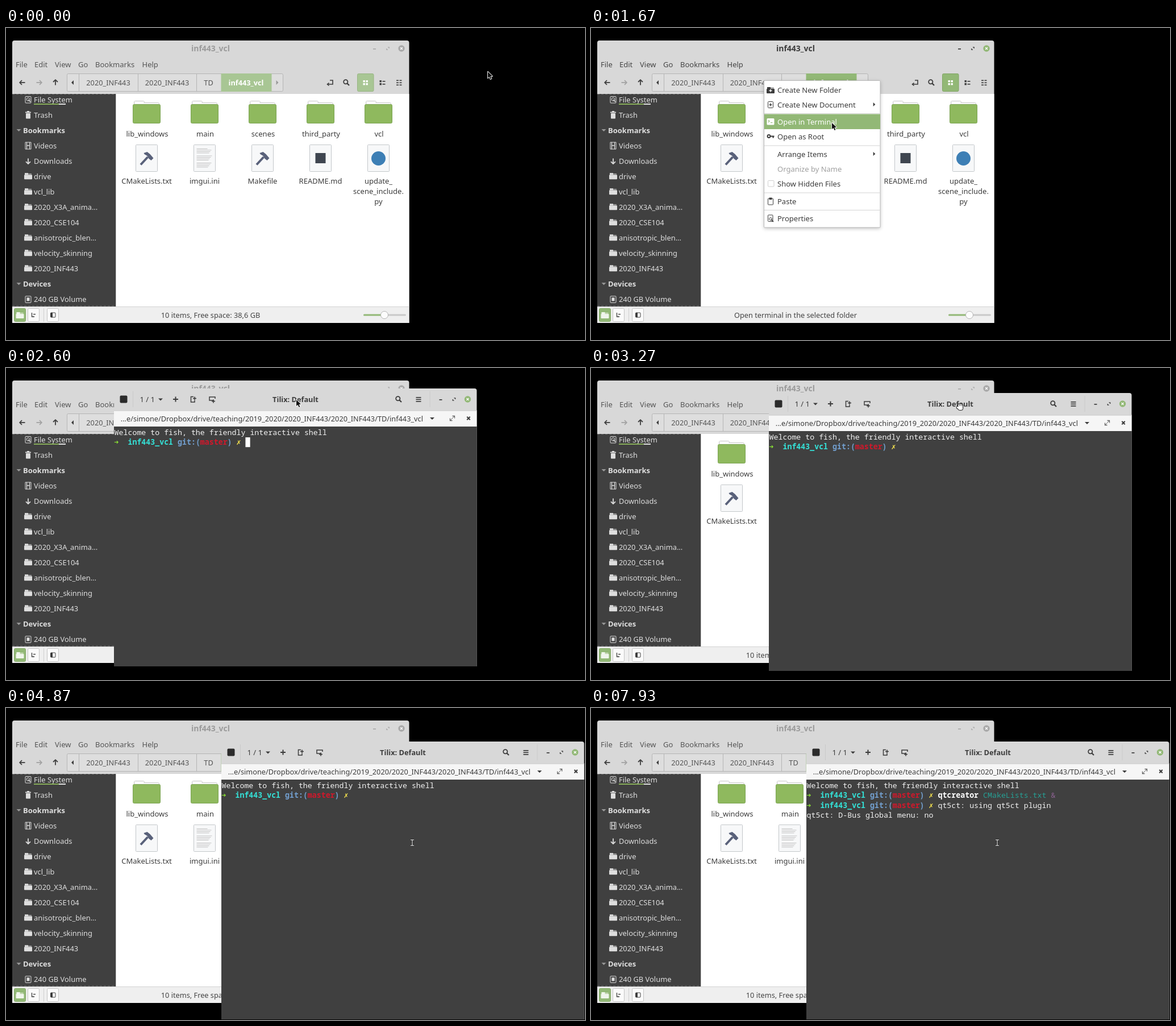
Recreate the animation shown at these times as an HTML page with a canvas. Size 1019 px wide and 549 px high, loop 8000 ms.

```html
<!DOCTYPE html>
<html lang="en">
<head>
<meta charset="utf-8">
<title>Opening a project from a terminal</title>
<style>
html, body { margin: 0; width: 100%; height: 100%; overflow: hidden; background: #000; }
canvas { display: block; }
</style>
</head>
<body>
<canvas id="stage" width="1019" height="549"></canvas>
<script>
const c = document.getElementById('stage').getContext('2d');
const LOOP = 8000, STEP = 1000 / 15;
const SANS = '"Noto Sans", "Open Sans", sans-serif';
const MONO = '"Noto Sans Mono", "DejaVu Sans Mono", monospace';
const CHROME = '#d8d8d8', DARK = '#404040', INK = '#3c3c3c', GREEN = '#92b876', PALE = '#a8c694';
const CELL = 7.96, ROW = 17.6, SMALL = 12.75;

// drawing helpers
function text(s, x, y, color = INK, align = 'left', weight = 400, size = 13, family = SANS) {
  c.font = `${weight} ${size}px ${family}`;
  c.textAlign = align;
  c.fillStyle = color;
  c.fillText(s, x, y);
}
function rect(x, y, w, h, fill) { c.fillStyle = fill; c.fillRect(x, y, w, h); }
function box(x, y, w, h, r, fill, stroke) {
  c.beginPath();
  c.roundRect(x, y, w, h, r);
  if (fill) { c.fillStyle = fill; c.fill(); }
  if (stroke) { c.strokeStyle = stroke; c.lineWidth = 1; c.stroke(); }
}
function disc(x, y, r, fill, stroke) {
  c.beginPath();
  c.arc(x, y, r, 0, 7);
  if (fill) { c.fillStyle = fill; c.fill(); }
  if (stroke) { c.strokeStyle = stroke; c.stroke(); }
}
function trace(points) {
  c.beginPath();
  points.forEach(([x, y], i) => i ? c.lineTo(x, y) : c.moveTo(x, y));
}
function line(points, color = INK, width = 1.6) {
  trace(points);
  c.strokeStyle = color;
  c.lineWidth = width;
  c.stroke();
}
function poly(points, fill) { trace(points); c.closePath(); c.fillStyle = fill; c.fill(); }
function at(x, y, draw) { c.save(); c.translate(x, y); draw(); c.restore(); }

// small icons, each around its centre
function arrow(x, y, turn, color = INK) {
  at(x, y, () => {
    c.rotate(turn);
    line([[-4.5, 0], [4.5, 0]], color, 1.8);
    line([[1, -4], [4.8, 0], [1, 4]], color, 1.8);
  });
}
function triangle(x, y, turn, s, color = INK) {
  at(x, y, () => { c.rotate(turn); poly([[-s / 2, -s], [s / 2, 0], [-s / 2, s]], color); });
}
function lens(x, y) {
  c.lineWidth = 1.8;
  disc(x - 1.2, y - 1.2, 3.6, null, INK);
  line([[x + 1.5, y + 1.5], [x + 5, y + 5]], INK, 2.2);
}
function cross(x, y, s, color, width = 1.5) {
  line([[x - s, y - s], [x + s, y + s]], color, width);
  line([[x + s, y - s], [x - s, y + s]], color, width);
}
function expand(x, y, s, color, width = 1.4) {
  line([[x, y - s], [x + s, y - s], [x + s, y]], color, width);
  line([[x - s, y], [x - s, y + s], [x, y + s]], color, width);
  if (s > 3) line([[x - s, y + s], [x + s, y - s]], color, 1);
}
function miniFolder(x, y, color) {
  rect(x - 6, y - 5, 6, 3, color);
  box(x - 7, y - 2, 14, 8, 1, color);
  rect(x - 6, y - 3.8, 12, 1, color);
}
function windowButtons(x, y, active) {
  const ink = active ? INK : '#ababab';
  rect(x - 50, y, 5, 1.7, ink);
  expand(x - 24, y, 2.2, ink, 1.3);
  disc(x, y, 5.7, active ? GREEN : '#a9a9a9');
  cross(x, y, 2, '#fff', 1.3);
}

function sidebar() {
  rect(11, 116, 182.5, 374, DARK);
  c.setLineDash([4, 3]);
  line([[11, 116.5], [193, 116.5]], '#6b6b6b', 1);
  line([[11, 489], [193, 489]], '#6b6b6b', 1);
  c.setLineDash([]);
  const rows = ['File System', 'Trash', '*Bookmarks', 'Videos', 'Downloads', 'drive', 'vcl_lib',
    '2020_X3A_anima...', '2020_CSE104', 'anisotropic_blen...', 'velocity_skinning', '2020_INF443',
    '*Devices', '240 GB Volume'];
  const pale = '#dedede';
  rows.forEach((name, i) => {
    const y = 126 + 27.03 * i;
    if (name[0] === '*') {
      triangle(22.5, y, Math.PI / 2, 4, '#9a9a9a');
      text(name.slice(1), 30, y + 4.7, pale, 'left', 700);
      return;
    }
    text(name, 49, y + 4.7, pale, 'left', 400, 12.9);
    if (i === 0 || i === 13) {
      box(34, y - 5.5, 10, 11.5, 1, null, pale);
      if (i) rect(36.5, y - 3, 5, 6, pale);
      else { disc(39, y - 0.5, 2.8, null, pale); line([[39, y], [43, y + 4]], pale, 1.5); }
    } else if (i === 1) {
      rect(34, y - 5.5, 10, 1.8, pale);
      rect(37, y - 7, 4, 2, pale);
      box(35, y - 3, 8, 9.5, 1, pale);
    } else if (i === 3) {
      box(34, y - 6, 10, 12, 0, null, pale);
      line([[36.5, y - 6], [36.5, y + 6]], pale, 1.3);
      line([[41.5, y - 6], [41.5, y + 6]], pale, 1.3);
      rect(36.5, y - 1, 5, 1.4, pale);
    } else if (i === 4) arrow(39, y, Math.PI / 2, pale);
    else miniFolder(39, y - 1, pale);
  });
  rect(49, 133, 44, 1.8, '#8fb95c');
  rect(93, 133, 12, 1.8, '#f0f0f0');
}

function folder(x, name) {
  box(x - 22, 128.5, 18, 12, 2, '#fbfbfb', '#c9c9c9');
  box(x - 22, 131.5, 44, 20, 2, '#fbfbfb', '#c9c9c9');
  rect(x - 21, 129.5, 16, 6, '#fbfbfb');
  box(x - 24, 134.5, 48, 33, 2, '#8fb95e', '#7aa351');
  text(name, x + 1, 191, INK, 'center');
}
function paper(x, lines, kind) {
  box(x - 19, 205.5, 38, 47, 1, '#f7f8f9', '#c3c7ca');
  lines.forEach((s, i) => text(s, x, 273.5 + 18.4 * i, INK, 'center'));
  if (kind === 'hammer') at(x, 229, () => {
    line([[-10.5, 11.5], [2, -2]], '#59617a', 4);
    poly([[-5, -9], [1, -11], [6, -7], [12, 0], [8, 4], [4, 1], [1, -4], [-4, -7]], '#59617a');
  });
  if (kind === 'text') for (let i = 0; i < 15; i++) {
    if (i % 5 !== 4) rect(x - 14, 212 + 2.5 * i, 19 + (i * 7) % 9, 0.9, '#bfbfbf');
  }
  if (kind === 'square') rect(x - 9, 220, 18, 18, '#3f4650');
  if (kind === 'disc') disc(x, 229.5, 12.5, '#3d7fb5');
}

function fileWindow(active, status) {
  box(11, 22, 698.5, 497, [4, 4, 0, 0], CHROME);
  text('inf443_vcl', 360, 41, active ? INK : '#9b9b9b', 'center', 700, 14);
  windowButtons(696, 36, active);
  const menuInk = active ? '#454545' : '#555';
  [['File', 17], ['Edit', 50], ['View', 86], ['Go', 127], ['Bookmarks', 157], ['Help', 239.5]]
    .forEach(([s, x]) => text(s, x, 68.5, menuInk));

  const green = active ? GREEN : PALE;
  arrow(29, 96, Math.PI);
  arrow(58, 96, 0, '#a2a2a2');
  arrow(87, 96, -Math.PI / 2);
  box(107.5, 80.5, 380, 31, 2, '#dedede', '#b5b5b5');
  rect(378.5, 80, 89, 32, green);
  [128.5, 232.5, 335.5].forEach(x => rect(x - 0.5, 81, 1, 30, '#b5b5b5'));
  triangle(117, 96, Math.PI, 4);
  triangle(477.5, 96, 0, 4, '#999');
  [['2020_INF443', 180], ['2020_INF443', 283.5], ['TD', 356.5]]
    .forEach(([s, x]) => text(s, x, 101, '#555', 'center', 400, SMALL));
  text('inf443_vcl', 422.5, 101, '#fff', 'center', 700, SMALL);
  line([[570, 92], [575, 92], [575, 99], [566, 99]]);
  line([[568.5, 96.5], [565.5, 99], [568.5, 101.5]]);
  lens(599, 96);
  box(618.5, 80.5, 28.5, 31, 2, green, active ? '#7fa463' : '#97b482');
  for (let i = 0; i < 4; i++) rect(628.5 + 5 * (i % 2), 92 + 5 * (i >> 1), 3.4, 3.4, '#fff');
  for (let i = 0; i < 2; i++) {
    rect(657.5, 92 + 5 * i, 3.4, 3.4, INK);
    rect(662.5, 93 + 5 * i, 5, 1.6, INK);
  }
  for (let i = 0; i < 6; i++) rect(687 + 5.5 * (i % 2), 91.5 + 4 * (i >> 1), 4, 1.6, INK);

  sidebar();
  rect(193.5, 116, 516, 374, '#fff');
  const column = i => 247.5 + 102 * i;
  ['lib_windows', 'main', 'scenes', 'third_party', 'vcl'].forEach((s, i) => folder(column(i), s));
  [[['CMakeLists.txt'], 'hammer'], [['imgui.ini'], 'text'], [['Makefile'], 'hammer'],
    [['README.md'], 'square'], [['update_', 'scene_include.', 'py'], 'disc']]
    .forEach(([s, kind], i) => paper(column(i), s, kind));

  rect(11, 490, 698.5, 29, '#efefef');
  rect(11, 490, 698.5, 1, '#d2d2d2');
  box(14.5, 493.5, 20, 23, 2, GREEN, '#83a868');
  miniFolder(24.5, 505, '#f0f5ec');
  box(38.5, 493.5, 20, 23, 2, '#fafafa', '#c4c4c4');
  line([[45.5, 501], [45.5, 508], [50, 508]], INK, 1.3);
  rect(48, 503, 4, 1.3, INK);
  rect(66, 493, 1, 24, '#d0d0d0');
  box(72.5, 493.5, 20, 23, 2, '#fafafa', '#c4c4c4');
  box(78.5, 501, 8.5, 8, 1, null, INK);
  rect(79, 501, 3, 8, INK);
  text(status, 360, 510, '#444', 'center', 400, SMALL);
  box(629, 503.5, 37, 3, 1.5, GREEN);
  box(666, 503.5, 38, 3, 1.5, '#c9c9c9');
  disc(666, 505, 6.5, '#fcfcfc', '#b3b3b3');
}

const MENU = [['Create New Folder', 109], ['Create New Document', 135], ['Open in Terminal', 165],
  ['Open as Root', 191.5], ['Arrange Items', 222], ['Organize by Name', 248],
  ['Show Hidden Files', 274.5], ['Paste', 305], ['Properties', 335]];

function hoveredItem([x, y]) {
  return x < 305 ? -1 : MENU.findIndex(([, cy], i) => i !== 5 && Math.abs(y - cy) < 13.3);
}
function contextMenu(hover) {
  c.save();
  c.shadowColor = 'rgba(0,0,0,.25)';
  c.shadowBlur = 6;
  c.shadowOffsetY = 2;
  box(304.5, 92.5, 204.5, 258.5, 1, '#fff');
  c.restore();
  box(304.5, 92.5, 204.5, 258.5, 1, null, '#b9b9b9');
  [150, 206.5, 289.5, 320].forEach(y => rect(305, y, 203.5, 1, '#d4d4d4'));
  MENU.forEach(([s, y], i) => {
    const ink = i === hover ? '#fff' : i === 5 ? '#a0a0a0' : INK;
    if (i === hover) rect(305, y - 13.5, 204, 26.5, GREEN);
    text(s, 328, y + 4.8, ink);
    const x = 316;
    if (i === 0) { miniFolder(x, y, ink); rect(x - 2.5, y + 0.5, 5, 1.4, '#fff'); rect(x - 0.7, y - 1.3, 1.4, 5, '#fff'); }
    if (i === 1) { box(x - 4.5, y - 5.5, 9, 11, 1, null, ink); rect(x - 2.5, y - 0.7, 5, 1.4, ink); rect(x - 0.7, y - 2.5, 1.4, 5, ink); }
    if (i === 2) {
      box(x - 6.5, y - 6, 13, 11.5, 1.5, ink);
      const cut = i === hover ? GREEN : '#fff';
      line([[x - 4, y - 3], [x - 2, y - 1], [x - 4, y + 1]], cut, 1.1);
      rect(x, y + 1, 3.5, 1.1, cut);
    }
    if (i === 3) { c.lineWidth = 2; disc(x - 3, y - 1, 2.4, null, ink); rect(x - 0.5, y - 2, 7, 2, ink); rect(x + 3.5, y - 1, 2.2, 3, ink); }
    if (i === 6) box(x - 4.5, y - 6, 10.5, 10.5, 1, '#fff', '#cfcfcf');
    if (i === 7) { box(x - 4.5, y - 5, 9, 11, 1, null, ink); rect(x - 2.5, y - 6.5, 5, 3.5, ink); }
    if (i === 8) { box(x - 4.5, y - 6, 8.5, 11.5, 1, null, ink); disc(x, y + 1, 2.3, null, ink); line([[x + 1, y + 2], [x + 5, y + 6]], ink, 1.7); }
    if (i === 1 || i === 4) triangle(498.5, y - 0.5, 0, 3.6, ink);
  });
}

// terminal text: runs are [column, string, colour, weight]
const PROMPT = [[0, '➜', '#8ae234', 700], [3, 'inf443_vcl', '#34e2d8', 700], [14, 'git:(', '#729fcf', 700],
  [19, 'master', '#d0182b', 700], [25, ')', '#729fcf', 700], [27, '✗', '#fce94f', 700]];
const WHITE = '#f2f2f2', HINT = '#747674';
const COMMAND = [[29, 'qtcreator', '#fff', 700], [39, 'CMakeLists.txt', '#26a095', 400], [54, '&', '#8b6190', 400]];

function typed(n) {
  return [[29, 'qt'.slice(0, n), '#d0182b', 400], [29 + n, 'qtcreator CMakeLists.txt &'.slice(n), HINT, 400]];
}
const KEYS = { ready: 2530, first: 5200, second: 5730, accept: 5920, enter: 7330, output: 7600, menu: 7660 };

function shell(t) {
  if (t < KEYS.ready) return { rows: [], cursor: [0, 0], since: 2300 };
  const rows = [[[0, 'Welcome to fish, the friendly interactive shell', WHITE, 400]], PROMPT.slice()];
  let cursor = [29, 1], since = KEYS.ready;
  if (t >= KEYS.accept) { rows[1].push(...COMMAND); cursor = [55, 1]; since = KEYS.accept; }
  else if (t >= KEYS.second) { rows[1].push(...typed(2)); cursor = [31, 1]; since = KEYS.second; }
  else if (t >= KEYS.first) { rows[1].push(...typed(1)); cursor = [30, 1]; since = KEYS.first; }
  if (t >= KEYS.enter) { rows.push(PROMPT.slice()); cursor = [29, 2]; since = KEYS.enter - 40; }
  if (t >= KEYS.output) { rows[2].push([29, 'qt5ct: using qt5ct plugin', WHITE, 400]); cursor = [0, 3]; }
  if (t >= KEYS.menu) { rows.push([[0, 'qt5ct: D-Bus global menu: no', WHITE, 400]]); cursor = [0, 4]; }
  return { rows, cursor, since };
}

function terminal(t) {
  box(0, 0, 638.5, 489, [4, 4, 0, 0], CHROME);
  rect(0, 38.5, 638.5, 28.5, '#f6f6f6');
  rect(0, 38.5, 638.5, 1, '#c2c2c2');
  rect(0, 67, 638.5, 422, DARK);
  box(10.5, 12.5, 13, 13, 2, '#2b2b2b');
  [33, 555.5].forEach(x => rect(x, 5, 1, 28, '#c9c9c9'));
  text('1 / 1', 45.5, 24);
  triangle(82, 19.5, Math.PI / 2, 4);
  rect(104, 18, 9, 2, INK);
  rect(107.5, 14.5, 2, 9, INK);
  line([[140, 14.5], [135.5, 14.5], [135.5, 24], [142, 24], [142, 21]], INK, 1.5);
  line([[139, 17.5], [145, 17.5]]);
  line([[142, 14.5], [142, 20.5]]);
  line([[176, 21], [168, 21], [168, 15], [178, 15], [178, 18]], INK, 1.5);
  line([[172, 22.5], [178, 22.5]]);
  line([[175, 19.5], [175, 25.5]]);
  text('Tilix: Default', 319.5, 24, INK, 'center', 700, SMALL);
  lens(501, 19);
  [15, 18.5, 22].forEach(y => rect(531.5, y, 9, 1.7, INK));
  windowButtons(622.5, 19, true);
  text('...e/simone/Dropbox/drive/teaching/2019_2020/2020_INF443/2020_INF443/TD/inf443_vcl',
    544, 58, INK, 'right', 400, SMALL);
  triangle(560, 53, Math.PI / 2, 4);
  expand(595.5, 52.5, 4, '#666', 1.3);
  cross(624, 52.5, 2.7, INK, 2);

  const { rows, cursor, since } = shell(t);
  rows.forEach((runs, r) => runs.forEach(([col, s, color, weight]) =>
    text(s, 0.6 + col * CELL, 81.6 + r * ROW, color, 'left', weight, 13.27, MONO)));
  if (Math.floor((t - since) / 600) % 2 === 0) {
    rect(0.6 + cursor[0] * CELL, 68.4 + cursor[1] * ROW, 8.2, 17.2, '#fff');
  }
}

// motion: [time, x, y], eased between stops unless a stop is marked linear
const MOUSE = [[0, 848, 77], [70, 848, 77], [800, 304, 351], [1000, 304, 351], [1620, 424, 167],
  [2080, 424, 167], [2560, 511, 56], [2640, 511, 56], [2800, 521, 60]];
const DRAG = [[2830, 190, 36], [3270, 314, 44, true], [3670, 367, 55, true], [3800, 373, 56.6, true], [3980, 379, 59, true]];
const RELEASE = [[4060, 710, 83], [4500, 715, 237]];
const GRIP = [331, 23.5], LAG = 35;

function along(path, t) {
  const i = path.findIndex(p => p[0] > t);
  if (i < 0) return path[path.length - 1].slice(1, 3);
  if (i === 0) return path[0].slice(1, 3);
  const a = path[i - 1], b = path[i];
  let k = (t - a[0]) / (b[0] - a[0]);
  if (!b[3]) k = k * k * (3 - 2 * k);
  return [a[1] + (b[1] - a[1]) * k, a[2] + (b[2] - a[2]) * k];
}

function pointer(x, y, shape) {
  at(x, y, () => {
    c.lineJoin = 'round';
    if (shape === 'arrow') {
      trace([[0, 0], [0, 11], [2.6, 8.7], [4.6, 13], [6.4, 12.2], [4.5, 8], [8, 7.8]]);
      c.closePath();
      c.strokeStyle = '#fff';
      c.lineWidth = 1.8;
      c.stroke();
      c.fillStyle = '#111';
      c.fill();
    } else if (shape === 'hand') {
      box(-3.5, -5.5, 9, 11.5, 3, '#fff', '#111');
      box(-6, -1, 5, 4.5, 2, '#fff', '#111');
      rect(-3, -1, 6, 5, '#fff');
      [-1, 1.3, 3.5].forEach(fx => rect(fx, -5, 0.8, 3.5, '#333'));
    } else {
      for (const [ink, w] of [['#111', 2.8], ['#eee', 1.2]]) {
        line([[-3, -5], [3, -5]], ink, w);
        line([[-3, 5], [3, 5]], ink, w);
        line([[0, -5], [0, 5]], ink, w);
      }
    }
    c.lineJoin = 'miter';
  });
}

function draw(t) {
  rect(0, 0, 1019, 549, '#000');
  const [wx, wy] = along(DRAG, t).map(Math.round);
  const dragging = t >= 2800 && t < 4030;
  // the window trails the hand that drags it
  const mouse = dragging ? along(DRAG, t + LAG).map((v, i) => v + GRIP[i])
    : along(t < 3000 ? MOUSE : RELEASE, t);
  const menuOpen = t >= 930 && t < 1995;
  const hover = menuOpen ? hoveredItem(mouse) : -1;
  fileWindow(t >= 850 && t < 2250,
    hover === 2 ? 'Open terminal in the selected folder' : '10 items, Free space: 38,6 GB');
  if (menuOpen) contextMenu(hover);
  if (t >= 2250) at(wx, wy, () => {
    c.globalAlpha = Math.min(1, (t - 2200) / 200);
    terminal(t);
  });
  const inShell = t > 4000 && mouse[1] > wy + 67;
  pointer(...mouse, dragging ? 'hand' : inShell ? 'beam' : 'arrow');
}

const start = performance.now();
function tick() {
  const t = (performance.now() - start) % LOOP;
  draw(Math.floor((t + 4) / STEP) * STEP % LOOP);
  requestAnimationFrame(tick);
}
tick();
</script>
</body>
</html>
```
